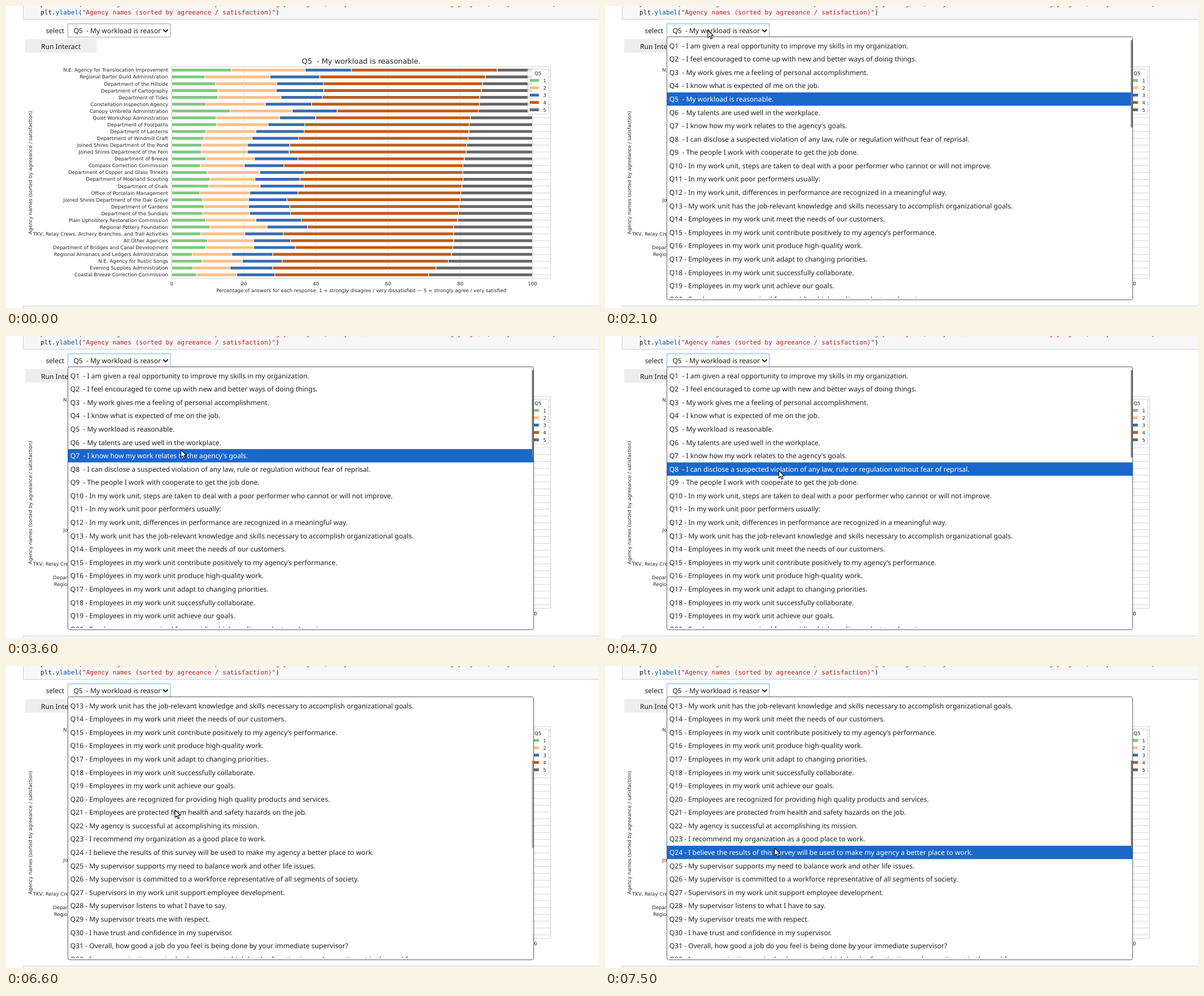
Recreate the animation shown at these times as an HTML page. Size 1049 by 534 pixels, loop 8000 ms.

```html
<!DOCTYPE html>
<html lang="en">
<head>
<meta charset="utf-8">
<title>Survey explorer</title>
<style>
  html, body { margin: 0; width: 100%; height: 100%; overflow: hidden; background: #fff; }
  svg { display: block; width: 1049px; height: 534px; }
  text { white-space: pre; text-rendering: geometricPrecision; }
  .plot { font: 8.55px "DejaVu Sans", sans-serif; fill: #262626; }
  .ui { font: 12.1px "Noto Sans", "Open Sans", sans-serif; fill: #212121; }
  .code { font: 11.15px "DejaVu Sans Mono", monospace; fill: #212121; }
  .str { fill: #ba2121; }
  .prop { fill: #0055aa; }
  .hover { filter: drop-shadow(0 1px 1px rgba(0, 0, 0, .35)); }
</style>
</head>
<body>
<svg id="stage" viewBox="0 0 1049 534" xmlns="http://www.w3.org/2000/svg"></svg>
<script>
const LOOP = 8000;
const COLORS = ["#7fc97f", "#fdc086", "#386cb0", "#bf5b17", "#666666"];
const AXES = { left: 293, right: 963.5, top: 107.5, bottom: 481.5, unit: 6.383 };
const ROW0 = 113.3, ROW_STEP = 12.067;

// Label, then the x where each of the first four segments ends.
const BARS = [
  ["N.E. Agency for Translocation Improvement", 398.5, 529.5, 611, 869],
  ["Regional Barter Guild Administration", 351.5, 467, 555, 848],
  ["Department of the Hillside", 370.5, 479, 561.5, 843],
  ["Department of Cartography", 375, 478, 562, 841],
  ["Department of Tides", 375, 486.5, 559.5, 838],
  ["Constellation Inspection Agency", 353.5, 459, 540.5, 837.5],
  ["Canopy Umbrella Administration", 396.5, 506.5, 586, 835.5],
  ["Quiet Workshop Administration", 371.5, 484, 548, 821.5],
  ["Department of Footpaths", 373, 463.5, 528.5, 819.5],
  ["Department of Lanterns", 354, 442, 527.5, 819],
  ["Department of Windmill Craft", 350, 435.5, 517.5, 817.5],
  ["Joined Shires Department of the Pond", 346.5, 427, 502, 815],
  ["Joined Shires Department of the Fern", 345.5, 427, 501, 814],
  ["Department of Breeze", 354, 439.5, 516.5, 811],
  ["Compass Correction Commission", 344, 421.5, 491.5, 808.5],
  ["Department of Copper and Glass Trinkets", 356, 449, 527.5, 808],
  ["Department of Moorland Scouting", 361, 440.5, 520, 808.5],
  ["Department of Chalk", 358.5, 449.5, 527.5, 806.5],
  ["Office of Porcelain Management", 343, 431, 516.5, 804.5],
  ["Joined Shires Department of the Oak Grove", 348, 429, 497, 803.5],
  ["Department of Gardens", 350.5, 429, 502, 801.5],
  ["Department of the Sundials", 347.5, 431, 503.5, 800.5],
  ["Plain Upholstery Restoration Commission", 353, 442, 522.5, 799],
  ["Regional Pottery Foundation", 360.5, 462, 533.5, 792],
  ["TKV, Relay Crews, Archery Branches, and Trail Activities", 344.5, 422.5, 490.5, 792],
  ["All Other Agencies", 356.5, 438, 503.5, 792],
  ["Department of Bridges and Canal Development", 353, 438, 512, 790.5],
  ["Regional Almanacs and Ledgers Administration", 329.5, 399.5, 472, 788],
  ["N.E. Agency for Rustic Songs", 346.5, 418, 488.5, 782.5],
  ["Evening Supplies Administration", 330.5, 396.5, 472, 761],
  ["Coastal Breeze Correction Commission", 337, 408.5, 475.5, 748],
];

const QUESTIONS = [
  "I am given a real opportunity to improve my skills in my organization.",
  "I feel encouraged to come up with new and better ways of doing things.",
  "My work gives me a feeling of personal accomplishment.",
  "I know what is expected of me on the job.",
  "My workload is reasonable.",
  "My talents are used well in the workplace.",
  "I know how my work relates to the agency's goals.",
  "I can disclose a suspected violation of any law, rule or regulation without fear of reprisal.",
  "The people I work with cooperate to get the job done.",
  "In my work unit, steps are taken to deal with a poor performer who cannot or will not improve.",
  "In my work unit poor performers usually:",
  "In my work unit, differences in performance are recognized in a meaningful way.",
  "My work unit has the job-relevant knowledge and skills necessary to accomplish organizational goals.",
  "Employees in my work unit meet the needs of our customers.",
  "Employees in my work unit contribute positively to my agency’s performance.",
  "Employees in my work unit produce high-quality work.",
  "Employees in my work unit adapt to changing priorities.",
  "Employees in my work unit successfully collaborate.",
  "Employees in my work unit achieve our goals.",
  "Employees are recognized for providing high quality products and services.",
  "Employees are protected from health and safety hazards on the job.",
  "My agency is successful at accomplishing its mission.",
  "I recommend my organization as a good place to work.",
  "I believe the results of this survey will be used to make my agency a better place to work.",
  "My supervisor supports my need to balance work and other life issues.",
  "My supervisor is committed to a workforce representative of all segments of society.",
  "Supervisors in my work unit support employee development.",
  "My supervisor listens to what I have to say.",
  "My supervisor treats me with respect.",
  "I have trust and confidence in my supervisor.",
  "Overall, how good a job do you feel is being done by your immediate supervisor?",
  "In my organization, senior leaders generate high levels of motivation and commitment in the workforce.",
].map((q, i) => `Q${i + 1}`.padEnd(4) + "- " + q);

const SCALE_NOTE = "Percentage of answers for each response: 1 = strongly disagree / very dissatisfied" +
  " --- 5 = strongly agree / very satisfied";
const ORDER_NOTE = "Agency names (sorted by agreeance / satisfaction)";

const stage = document.getElementById("stage");

function add(parent, tag, attrs = {}, content) {
  const el = document.createElementNS(stage.namespaceURI, tag);
  for (const key in attrs) el.setAttribute(key, attrs[key]);
  if (content !== undefined) el.textContent = content;
  parent.appendChild(el);
  return el;
}
const rect = (parent, x, y, width, height, attrs) => add(parent, "rect", { x, y, width, height, ...attrs });
const label = (parent, cls, x, y, str, attrs) => add(parent, "text", { class: cls, x, y, ...attrs }, str);
const path = (parent, d, attrs) => add(parent, "path", { d, fill: "none", ...attrs });
const MIDDLE = { "text-anchor": "middle" };

function clip(id, x, y, w, h) {
  rect(add(stage, "clipPath", { id }), x, y, w, h);
  return { "clip-path": `url(#${id})` };
}

function drawCodeLine(y, method, str) {
  const line = label(stage, "code", 61, y, "plt.");
  add(line, "tspan", { class: "prop" }, method);
  add(line, "tspan", {}, "(");
  add(line, "tspan", { class: "str" }, `"${str}"`);
  add(line, "tspan", {}, ")");
}

function drawNotebook() {
  const cell = { fill: "#f7f7f7", stroke: "#cfcfcf" };
  rect(stage, 30.5, -10, 1030, 33.5, cell);
  rect(stage, 30.5, 530.5, 1030, 20, cell);
  drawCodeLine(0.2, "xlabel", SCALE_NOTE);
  drawCodeLine(14.9, "ylabel", ORDER_NOTE);
}

function drawControls() {
  label(stage, "ui", 70.5, 47.8, "select");
  const box = rect(stage, 109.5, 31.5, 181, 23.5, { fill: "#fff" });
  label(add(stage, "g", clip("selectClip", 110, 32, 164.2, 22)), "ui", 119.4, 47.8, QUESTIONS[4]);
  path(stage, "M278 41.4L282.2 45.7L286.4 41.4", { stroke: "#111", "stroke-width": 1.9 });
  const button = rect(stage, 34, 58.5, 126, 24, { fill: "#eeeeee" });
  label(stage, "ui", 97, 75.6, "Run Interact", MIDDLE);
  return { box, button };
}

function drawChart() {
  const { left, right, top, bottom, unit } = AXES;
  const center = (left + right) / 2;
  const rowY = i => ROW0 + i * ROW_STEP;
  const tickX = v => left + v * unit;
  const ticks = [0, 20, 40, 60, 80, 100];

  let grid = `M${left} ${top}H${right}V${bottom}H${left}Z`;
  ticks.forEach(v => grid += `M${tickX(v)} ${top}V${bottom}`);
  BARS.forEach((_, i) => grid += `M${left} ${rowY(i)}H${right}`);
  path(stage, grid, { stroke: "#cccccc", "stroke-width": 0.85 });

  BARS.forEach(([name, ...ends], i) => {
    const edges = [left, ...ends, tickX(100)];
    COLORS.forEach((fill, k) => rect(stage, edges[k], rowY(i) - 3, edges[k + 1] - edges[k], 6,
      { fill, stroke: "#fff" }));
    label(stage, "plot", 286.8, rowY(i) + 3.1, name, { "text-anchor": "end" });
  });

  ticks.forEach(v => label(stage, "plot", tickX(v), 494.2, v, MIDDLE));
  label(stage, "plot", center, 506, SCALE_NOTE, MIDDLE);
  label(stage, "plot", 0, 0, ORDER_NOTE, { ...MIDDLE, transform: "translate(46 294.5) rotate(-90)" });
  label(stage, "plot", center, 102, "Q5  - My workload is reasonable.", { ...MIDDLE, style: "font-size:12.85px" });

  rect(stage, 923, 111.5, 37, 79.5, { rx: 2, fill: "#fff", "fill-opacity": 0.8, stroke: "#ccc", "stroke-width": 0.85 });
  label(stage, "plot", 941, 121.6, "Q5", MIDDLE);
  COLORS.forEach((fill, k) => {
    const y = 131.6 + 13 * k;
    rect(stage, 926, y - 3, 17.2, 6, { fill, stroke: "#fff" });
    label(stage, "plot", 950.2, y + 3.2, k + 1);
  });
}

const MENU = { left: 109.5, top: 54.5, width: 824, height: 465, first: 58.4, row: 23.585 };

function drawMenu() {
  const { left, top, width, height, first, row } = MENU;
  const group = add(stage, "g");
  rect(group, left, top, width, height, { rx: 3, fill: "#fff", stroke: "#5c5c5c" });
  const view = add(group, "g", clip("menuClip", left, first - 0.4, width, 458));
  const list = add(view, "g");
  const mark = rect(list, left, 0, width, row, { fill: "#1b68cb" });
  const items = QUESTIONS.map((q, i) => label(list, "ui", 113.8, first + row * i + 16.2, q));
  const bar = rect(group, 930.3, 60, 2.7, 155, { rx: 1.2, fill: "#757575" });
  return { group, list, mark, items, bar };
}

drawNotebook();
const controls = drawControls();
drawChart();
const menu = drawMenu();
const pointer = path(stage, "M0 0V13.4L3.1 10.5L5.2 15.5L7.5 14.5L5.4 9.7H9.6Z",
  { fill: "#fff", stroke: "#111", "stroke-width": 1.1, "stroke-linejoin": "round" });
pointer.setAttribute("fill", "#fff");

// Pointer waypoints: time, x, y.
const ROUTE = [
  [0, 140, -30], [600, 140, -30], [700, 139, -6], [1100, 118, 66], [1500, 176, 47],
  [1600, 180, 45], [1700, 183, 43], [1800, 182, 42.8], [2900, 182, 42.8],
  [3000, 197, 56], [3100, 211.5, 74.5], [3300, 253, 135], [3600, 309.5, 201.5],
  [3800, 313, 211], [3900, 316, 221], [4300, 316, 221], [5100, 299, 254.5],
  [6700, 299, 254.5], [6800, 299, 251], [6900, 298, 245], [7000, 298, 245],
  [7100, 299, 262], [7500, 300, 322], [LOOP, 300, 322],
];

function pointerAt(t) {
  const i = ROUTE.findIndex(p => p[0] > t);
  const [t0, x0, y0] = ROUTE[i - 1], [t1, x1, y1] = ROUTE[i];
  const k = (t - t0) / (t1 - t0);
  return [x0 + (x1 - x0) * k, y0 + (y1 - y0) * k];
}

function scrollAt(t) {
  return t < 5300 ? 0 : t < 5400 ? 6 : t < 5500 ? 9 : 12;
}

function selectedAt(t, y, scroll) {
  if (t < 3100) return 4;
  if (t >= 5300 && t < 6800) return 8;
  return scroll + Math.floor((y - MENU.first) / MENU.row);
}

function render(time) {
  const t = Math.floor((time % LOOP) / 100) * 100;
  const [x, y] = pointerAt(t);
  const open = t >= 2100;
  const scroll = scrollAt(t);
  const selected = selectedAt(t, y, scroll);
  const overButton = !open && x > 34 && x < 160 && y > 58 && y < 83;

  pointer.setAttribute("transform", `translate(${x} ${y})`);
  controls.button.setAttribute("class", overButton ? "hover" : "");
  controls.box.setAttribute("stroke", open ? "#64b5f6" : "#9e9e9e");
  menu.group.setAttribute("visibility", open ? "visible" : "hidden");
  menu.list.setAttribute("transform", `translate(0 ${-scroll * MENU.row})`);
  menu.mark.setAttribute("y", MENU.first + selected * MENU.row);
  menu.items.forEach((item, i) => item.style.fill = i === selected ? "#fff" : "");
  menu.bar.setAttribute("y", 60 + scroll * 8.92);
  menu.bar.setAttribute("opacity", t === 6600 ? 0.65 : t === 6700 ? 0.3 : 1);
}

const start = performance.now();
function tick() {
  render(performance.now() - start);
  requestAnimationFrame(tick);
}
tick();
</script>
</body>
</html>
```
